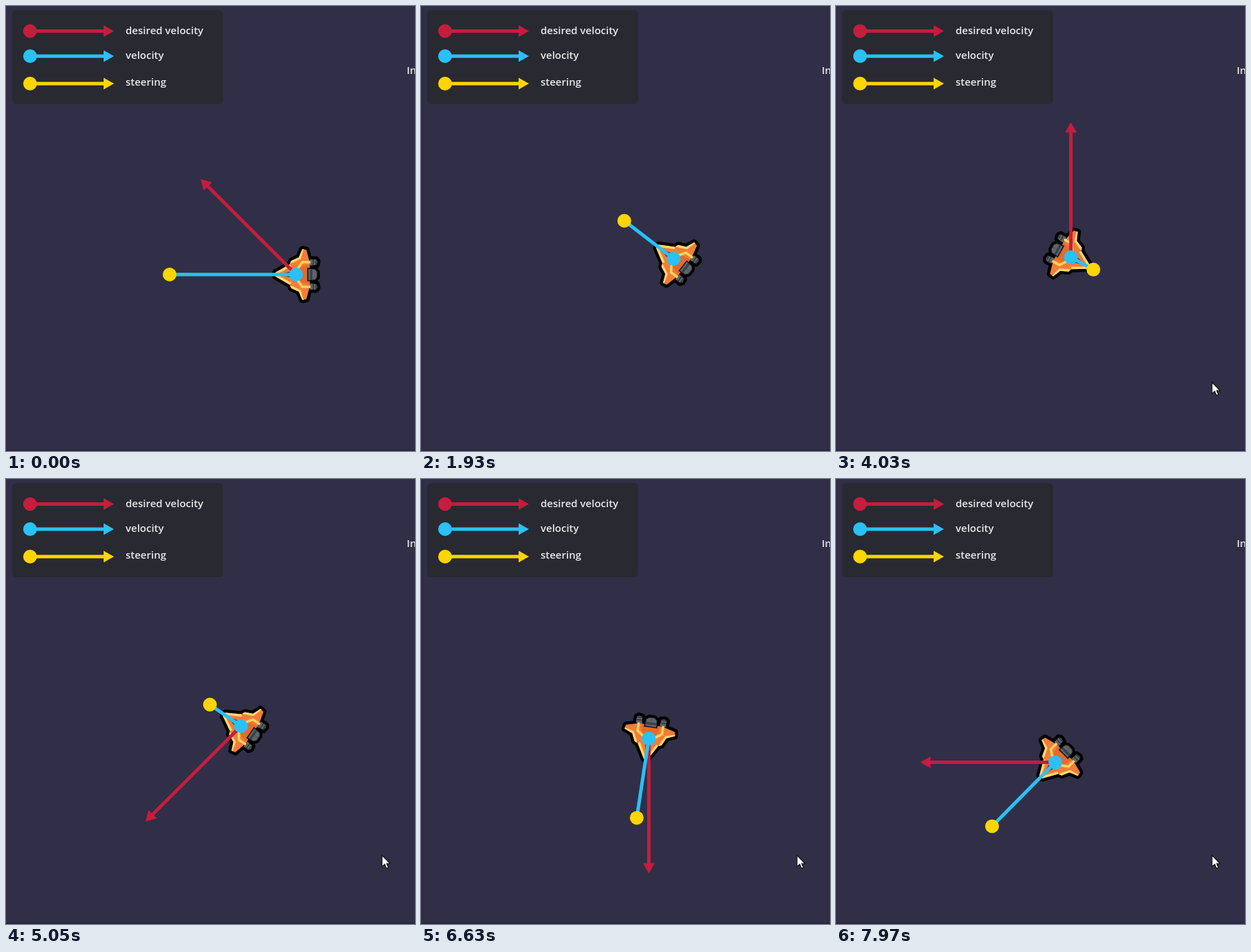
These frames come from a looping animation (595 px wide and 648 px high, 7.99 s). An HTML page:

```html
<!DOCTYPE html>
<html lang="en">
<head>
<meta charset="utf-8">
<title>Steering vectors</title>
<style>
  html, body { margin: 0; width: 100%; height: 100%; overflow: hidden; background: #302f47; }
  svg { display: block; width: 595px; height: 648px; }
  text { font: 600 15px "Open Sans", "Noto Sans", sans-serif; fill: #e9e9ec; }
  .red { color: #c51d3d; }
  .cyan { color: #29c1f6; }
  .yellow { color: #ffd503; }
  .arrow { fill: currentColor; stroke: none; }
  .arrow line, #velocity { stroke: currentColor; stroke-width: 5; }
  .outline { fill: #000; stroke: #000; stroke-width: 9; stroke-linejoin: round; }
</style>
</head>
<body>
<svg viewBox="0 0 595 648">
  <defs>
    <g id="legendArrow" class="arrow">
      <circle r="10"/>
      <line x2="109"/>
      <path d="M107-8.5 122 0 107 8.5Z"/>
    </g>
    <path id="hull" d="M-31 0-30-3-9-15-7-20 4-25 9-37 15-36 20-17 19 0Z"/>
    <path id="pod" d="M20-22 29-22 31-19 30-14 20-13Z"/>
    <path id="nozzle" d="M31 0V-4L28-8 17-9V0"/>
    <g id="shipOutline" class="outline">
      <use href="#hull"/><use href="#pod"/><use href="#nozzle" stroke-width="7"/>
    </g>
    <g id="shipHalf">
      <use href="#pod" fill="#5c6269"/>
      <path d="M25-22V-14M29-22V-14" stroke="#32363b" stroke-width="1.5"/>
      <use href="#hull" fill="#f17d38"/>
      <path d="M9-12 20-14 19 0-6 0Z" fill="#e46b2d"/>
      <path d="M-31 0-30-3-9-15-7-12-25-2V0Z" fill="#fbd873"/>
      <path d="M-9-16-7-20 4-25 9-37 11-37 7-23-5-17Z" fill="#fbd873"/>
      <path d="M2-8 9-18 21-18" fill="none" stroke="#fbd262" stroke-width="3.5"/>
      <path d="M-24 0-11-4 2-4 2 0Z" fill="#464d56"/>
      <path d="M-18 0-9-2H-2V0Z" fill="#7f94a2"/>
      <use href="#nozzle" fill="#5d646c" stroke="#111" stroke-width="1.5"/>
      <path d="M22-8V0" stroke="#383d43" stroke-width="3"/>
    </g>
  </defs>

  <rect width="595" height="648" fill="#302f47"/>
  <rect y="646" width="595" height="2" fill="#2b2440"/>
  <rect x="9" y="6" width="307" height="137" rx="6" fill="#292931"/>
  <use href="#legendArrow" class="red" x="35" y="36.5"/>
  <use href="#legendArrow" class="cyan" x="35" y="73"/>
  <use href="#legendArrow" class="yellow" x="35" y="113"/>
  <text x="174" y="41">desired velocity</text>
  <text x="174" y="77">velocity</text>
  <text x="174" y="116">steering</text>
  <text x="583" y="99">In</text>

  <g id="agent">
    <g id="ship">
      <use href="#shipOutline"/><use href="#shipOutline" transform="scale(1 -1)"/>
      <use href="#shipHalf"/><use href="#shipHalf" transform="scale(1 -1)"/>
    </g>
    <g id="desired" class="arrow red">
      <line x2="183"/>
      <path d="M181.5-8.5 196.5 0 181.5 8.5Z"/>
    </g>
    <line id="velocity" class="cyan"/>
    <circle class="arrow cyan" r="10"/>
    <circle id="steering" class="arrow yellow" r="10"/>
  </g>
  <path id="cursor" d="M0 0V16.5L4 13 6.5 19 9.3 17.8 6.8 12H11.8Z" fill="#fff" stroke="#111" stroke-width="1.2"/>
</svg>
<script>
const LOOP = 7.99;
const SPEED = 196.5;    // length of the desired velocity
const DRAG = 0.66;      // rate at which velocity approaches it
const TRAVEL = 0.212;   // distance moved per unit of drawn velocity

// [end time, direction in degrees, or null for no input]
const inputs = [
  [0.625, 225], [1.16, 270], [2.052, null], [2.594, 180], [2.79, 135],
  [3.02, 90], [3.22, 45], [3.945, 0], [4.02, null], [4.28, 270],
  [4.74, 225], [4.95, 180], [5.09, 135], [6.954, 90], [7.414, 135], [8, 180]
];
const pauses = [[0.72, 0.82], [1.53, 1.63], [2.35, 2.45]];
const cursorPath = [[2.05, 576, 532], [2.35, 560, 534], [2.77, 532, 540], [3.1, 547, 548]];

const $ = id => document.getElementById(id);
const place = (id, value) => $(id).setAttribute("transform", value);

// Exact solution of v' = DRAG (d - v), p' = TRAVEL v over each input.
function simulate(time) {
  const pos = [422, 391], vel = [-184, 0];
  let start = 0;
  for (const [end, angle] of inputs) {
    const span = Math.min(time, end) - start;
    const decay = Math.exp(-DRAG * span);
    const rad = angle * Math.PI / 180;
    const goal = angle === null ? [0, 0] : [SPEED * Math.cos(rad), SPEED * Math.sin(rad)];
    for (const i of [0, 1]) {
      const next = goal[i] + (vel[i] - goal[i]) * decay;
      pos[i] += TRAVEL * (goal[i] * span - (next - vel[i]) / DRAG);
      vel[i] = next;
    }
    if (time < end) return { pos, vel, angle };
    start = end;
  }
}

function cursorAt(time) {
  const next = cursorPath.findIndex(key => key[0] > time);
  if (next < 0) return cursorPath.at(-1).slice(1);
  const [t0, x0, y0] = cursorPath[next - 1], [t1, x1, y1] = cursorPath[next];
  const f = (time - t0) / (t1 - t0);
  return [x0 + (x1 - x0) * f, y0 + (y1 - y0) * f];
}

function draw(time) {
  time = Math.floor(time * 50 + 0.001) / 50;
  const pause = pauses.find(([from, to]) => time >= from && time < to - 0.001);
  if (pause) time = pause[0];

  const { pos, vel: [vx, vy], angle } = simulate(time);
  place("agent", `translate(${pos})`);
  place("ship", `rotate(${Math.atan2(vy, vx) * 180 / Math.PI + 180})`);
  place("desired", `rotate(${angle ?? 0})`);
  $("desired").style.display = angle === null ? "none" : "";
  $("velocity").setAttribute("x2", vx);
  $("velocity").setAttribute("y2", vy);
  place("steering", `translate(${vx} ${vy})`);

  const cursorShown = time >= cursorPath[0][0];
  $("cursor").style.display = cursorShown ? "" : "none";
  if (cursorShown) place("cursor", `translate(${cursorAt(time)})`);
}

const began = performance.now();
function tick() {
  draw((performance.now() - began) / 1000 % LOOP);
  requestAnimationFrame(tick);
}
tick();
</script>
</body>
</html>
```
